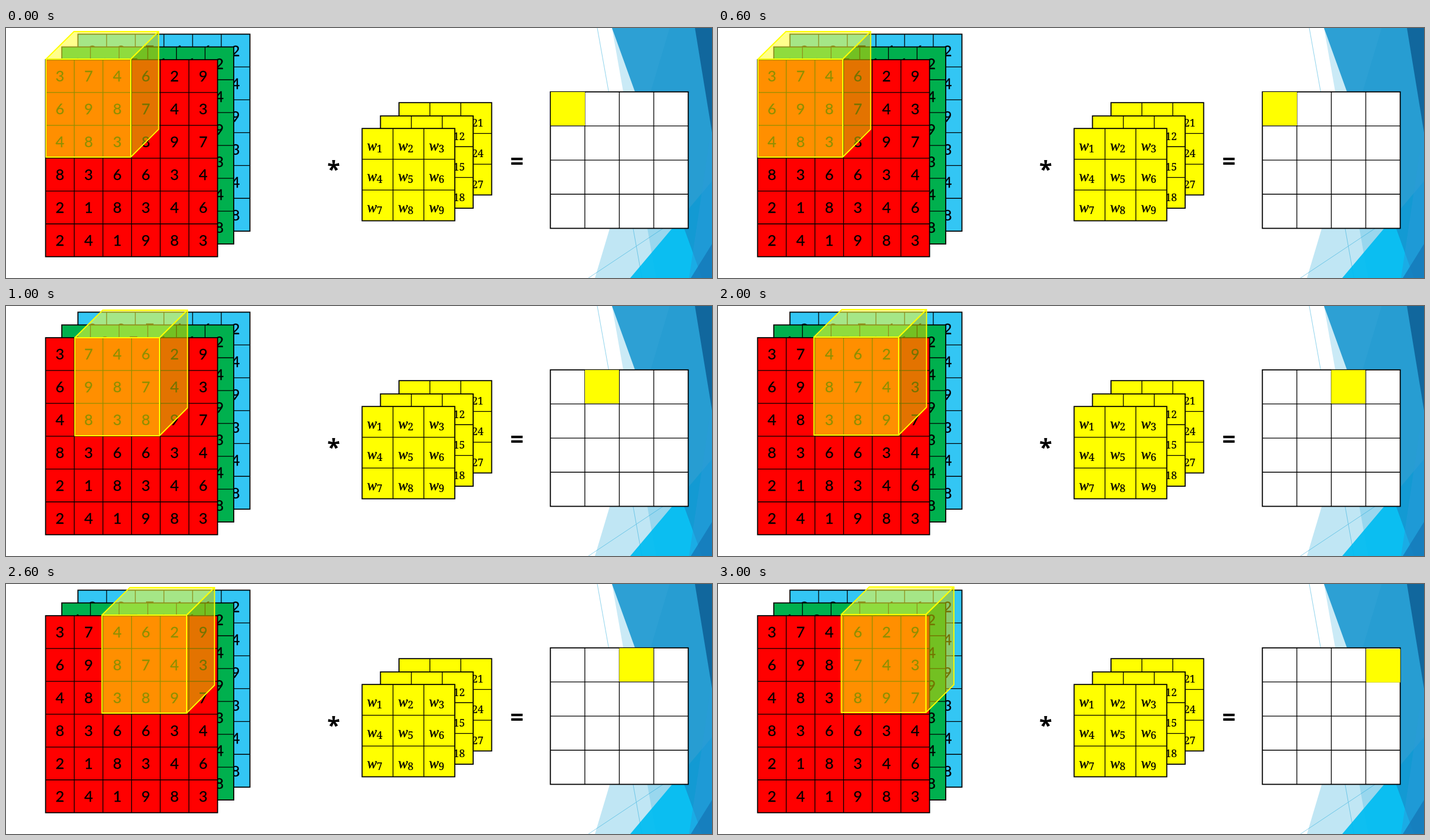
Animation, 1200 px wide and 426 px high, one loop 4000 ms. Source, as an HTML page:

```html
<!DOCTYPE html>
<html lang="en">
<head>
<meta charset="utf-8">
<title>Convolution over three channels</title>
<style>
  html, body { margin: 0; width: 100%; height: 100%; overflow: hidden; background: #fff; }
  svg { display: block; width: 100%; height: 100%; }
  .digit { font: 25.5px Lato, "Open Sans", sans-serif; text-anchor: middle; stroke: #000; stroke-width: .3; }
  .weight { font: italic 25px "Liberation Serif", serif; stroke: #000; stroke-width: .4; }
  .sub { font: 17.5px "Noto Serif", serif; stroke: #000; stroke-width: .2; }
  .sign { font: bold 40px "Open Sans", sans-serif; text-anchor: middle; }
  .cube { stroke: #ff0; stroke-width: 1.8; stroke-linejoin: round; fill-opacity: .56; }
</style>
</head>
<body>
<svg id="stage" viewBox="0 0 1200 426"></svg>
<script>
const stage = document.getElementById('stage');

function add(tag, attrs, text, parent = stage) {
  const el = document.createElementNS('http://www.w3.org/2000/svg', tag);
  for (const key in attrs) el.setAttribute(key, attrs[key]);
  if (text !== undefined) el.textContent = text;
  parent.append(el);
  return el;
}

const label = (cls, x, y, text) => add('text', { class: cls, x, y }, text);

const facet = (points, fill, opacity) => add('polygon', { points, fill, 'fill-opacity': opacity });

function grid(x, y, w, h, n, fill) {
  add('rect', { x, y, width: w, height: h, fill, stroke: '#000', 'stroke-width': 1.8 });
  let d = '';
  for (let i = 1; i < n; i++) {
    d += `M${x + w * i / n} ${y}v${h}M${x} ${y + h * i / n}h${w}`;
  }
  add('path', { d, stroke: '#000', 'stroke-width': 1.3 });
}

function channel(x, y, fill, rows) {
  grid(x, y, 292.3, 335.7, 6, fill);
  rows.forEach((row, r) => [...row].forEach((ch, c) =>
    label('digit', x + 24.3 + c * 48.72, y + 37.3 + r * 55.95, ch)));
}

function kernel(x, y, first) {
  grid(x, y, 157.5, 157.3, 3, '#ff0');
  for (let i = 0; i < 9; i++) {
    const left = x + 8.5 + i % 3 * 52.6 - (first > 1 ? 6 : 0);
    const base = y + 38 + Math.floor(i / 3) * 52.2;
    label('weight', left, base, 'w');
    label('sub', left + 16.3, base + 3, first + i);
  }
}

// Slanted glass panels on the right
for (const d of ['M1005 0L1081 426', 'M1200 286L990 426']) {
  add('path', { d, stroke: '#8fd3ec', 'stroke-width': 1 });
}
facet('1128,0 1200,0 1200,426 1001,426', '#0f9ed5', .26);
facet('1030,0 1200,0 1200,426 1105,426', '#0f9ed5', .22);
facet('1200,261 1200,426 1061,426', '#00bdf2', .93);
facet('1030,0 1200,0 1200,426 1183,426', '#1494cf', .86);
facet('1200,163 1200,426 1161,426', '#2a9bda', .5);
facet('1171,0 1200,0 1200,178', '#0d5f95', .85);
facet('1200,368 1200,426 1164,426', '#1479b8', .8);

channel(122.3, 10.5, '#33c6f4', ['227462', '637244', '482159', '836613', '218364', '241988']);
channel(94.8, 32.3, '#00b04e', ['427462', '637244', '482159', '836613', '218364', '241988']);
channel(67.3, 54, '#f00', ['374629', '698743', '483897', '836634', '218346', '241983']);

kernel(668, 127.2, 19);
kernel(636.5, 149.8, 10);
kernel(605.3, 171.2, 1);

label('sign', 557, 255, '*');
label('sign', 868.5, 241, '=');

grid(925.3, 108.8, 234.3, 232.6, 4, '#fff');
const cell = add('rect', { width: 58, height: 57, fill: '#ff0' });

const cube = add('g', { class: 'cube' });
const face = (points, fill) => add('polygon', { points, fill }, undefined, cube);
face('0,0 47.5,-47 191.5,-47 144,0', '#ffff33');
face('144,0 191.5,-47 191.5,119.5 144,167', '#cdcd00');
face('0,0 144,0 144,167 0,167', '#ff0');

const cubeAt = [[68, 53], [117, 54], [163, 53], [209.5, 52]];
const cellAt = [[926, 109], [984, 109], [1042.3, 109.2], [1101.7, 110.7]];

function draw() {
  const step = Math.floor(performance.now() / 1000) % 4;
  cube.setAttribute('transform', `translate(${cubeAt[step]})`);
  cell.setAttribute('x', cellAt[step][0]);
  cell.setAttribute('y', cellAt[step][1]);
  requestAnimationFrame(draw);
}
draw();
</script>
</body>
</html>
```
